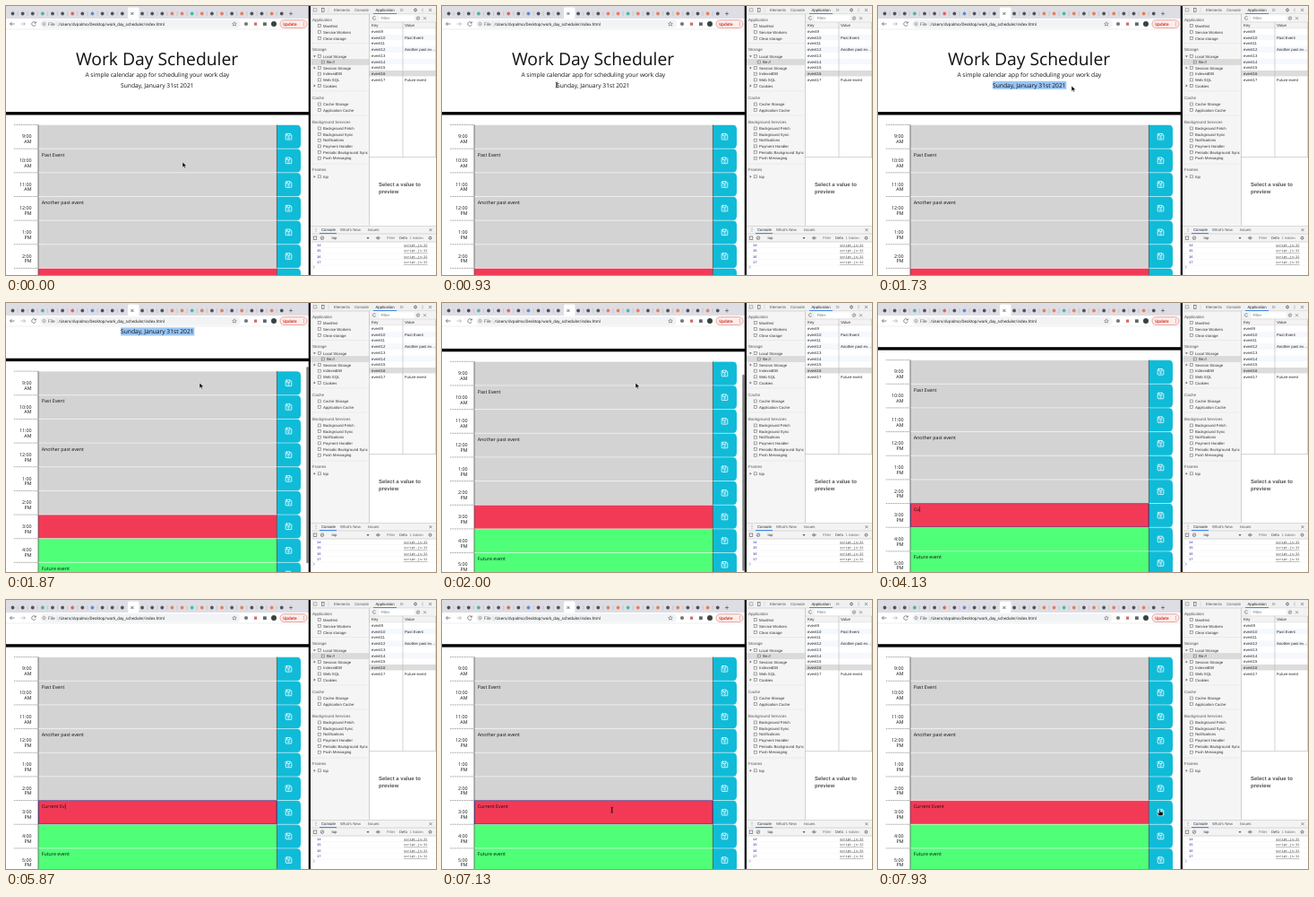
An HTML page that plays this animation: 480x300 px, repeating every 8 s.

```html
<!DOCTYPE html>
<html lang="en">
<head>
<meta charset="utf-8">
<title>Work Day Scheduler</title>
<style>
html, body { margin: 0; width: 100%; height: 100%; overflow: hidden; background: #fff; }
svg { display: block; width: 480px; height: 300px; }
text { white-space: pre; text-rendering: geometricPrecision; }
.page { font-family: "Open Sans", sans-serif; }
.ui { font-family: Roboto, sans-serif; }
.tools { font-family: "Liberation Sans", Arial, sans-serif; }
.mono { font-family: "Liberation Mono", monospace; }
</style>
</head>
<body>
<svg id="stage" viewBox="0 0 480 300"></svg>
<script>
const rect = (x, y, w, h, fill, extra = '') =>
  `<rect x="${x}" y="${y}" width="${w}" height="${h}" fill="${fill}" ${extra}/>`;
const text = (x, y, size, str, fill = '#111', extra = '') =>
  `<text x="${x}" y="${y}" font-size="${size}" fill="${fill}" ${extra}>${str}</text>`;
const path = (d, stroke, width = .7, extra = '') =>
  `<path d="${d}" fill="none" stroke="${stroke}" stroke-width="${width}" ${extra}/>`;
const dot = (x, y, r, fill, extra = '') =>
  `<circle cx="${x}" cy="${y}" r="${r}" fill="${fill}" ${extra}/>`;
const mid = 'text-anchor="middle"', end = 'text-anchor="end"', bold = 'font-weight="bold"';

const TOP = 132.5, PITCH = 26.66, NOW = 6, SCROLL = 68.9;
const HOURS = [9, 10, 11, 12, 1, 2, 3, 4, 5, 6];
const NOTES = { 1: 'Past Event', 3: 'Another past event', 8: 'Future event' };

function saveIcon(x, y) {
  return `<g transform="translate(${x} ${y})">` +
    path('M-3.3-2.7q0-.6.6-.6H1.8L3.3-1.8V2.7q0 .6-.6.6H-2.7q-.6 0-.6-.6zM-1.9-3.2V-.9H1.4V-3.2', '#fff', .8) +
    dot(0, 1.1, .9, 'none', 'stroke="#fff" stroke-width=".7"') + '</g>';
}

function hourRow(hour, i) {
  const y = TOP + i * PITCH;
  const fill = i < NOW ? '#d3d3d3' : i > NOW ? '#50ff78' : '#f23a57';
  return rect(36, y, 266.5, PITCH, fill) +
    `<path d="M302.3 ${y}h21.7q5 0 5 5v${PITCH - 10}q0 5-5 5h-21.7z" fill="#10bbd8"/>` +
    path(`M36 ${y}H329`, '#fff', .5) +
    path(`M9 ${y}H36`, '#777', .7, 'stroke-dasharray="1 .6"') +
    path(`M36 ${y}v${PITCH}M302.4 ${y}v${PITCH}`, '#444', .7) +
    saveIcon(315.5, y + 13.2) +
    text(28.5, y + 14.8, 5.34, hour + ':00', '#111', end) +
    text(28.5, y + 20.6, 5.34, i < 3 ? 'AM' : 'PM', '#111', end) +
    (NOTES[i] ? text(39.7, y + 8.6, 5.34, NOTES[i]) : '');
}

function page() {
  const y = TOP + NOW * PITCH;
  return '<g id="page" class="page">' +
    text(168.5, 65.8, 19.3, 'Work Day Scheduler', '#111', mid) +
    text(168.8, 78.6, 6.68, 'A simple calendar app for scheduling your work day', '#111', mid) +
    rect(128, 83.8, 0, 9, '#98c5f4', 'id="selection"') +
    text(168.8, 90.7, 6.68, 'Sunday, January 31st 2021', '#111', mid) +
    rect(0, 118.1, 338, 3.4, '#000') +
    HOURS.map(hourRow).join('') +
    rect(36.3, y + .2, 265.8, PITCH - .6, 'none', 'id="focus" stroke="#3a2f80" stroke-width=".7"') +
    text(39.7, y + 8.6, 5.34, '', '#111', 'id="typed"') +
    rect(0, y + 3.2, .5, 6.6, '#111', 'id="caret"') + '</g>' +
    rect(335.3, 26, 2.4, 219, '#7f7f7f', 'id="thumb" rx="1.2"');
}

const TAB_COLORS = { 3: '#4fb0a8', 6: '#d9695f', 8: '#5a8fd0', 18: '#3fbfa5',
  16: '#e2815f', 17: '#e2815f', 19: '#e2815f', 21: '#e2815f', 23: '#e2815f', 26: '#e2815f' };

function browserBar() {
  let s = '<g class="ui">' + rect(0, 0, 338, 14, '#dedde4') + rect(0, 14, 338, 12, '#fff') +
    path('M0 26H338', '#ddd', .5) + rect(136, 1.5, 12.5, 12.5, '#fff', 'rx="1.5"');
  for (let i = 0; i < 28; i++) {
    const x = 7.5 + i * 11.12;
    s += i === 12 ? path(`M${x - 1.5} 7l3 3m0-3l-3 3`, '#333')
      : dot(x, 8.5, 1.9, TAB_COLORS[i] || '#50535b');
    if (i < 27 && i !== 11 && i !== 12) s += path(`M${x + 5.6} 6v5`, '#a5a9af', .4);
  }
  return s + path('M316 8.5h4m-2-2v4', '#555') +
    path('M9.5 20h-5m2-2l-2 2 2 2', '#555') + path('M16.5 20h5m-2-2l2 2-2 2', '#aaa') +
    path('M33 18.8a2.3 2.3 0 1 0 .2 2M33.3 17.4v1.7h-1.7', '#555') +
    rect(38, 15.3, 224, 9.4, '#f1f3f4', 'rx="4.7"') +
    dot(42.5, 20, 1.7, 'none', 'stroke="#666" stroke-width=".5"') + path('M42.5 19.6v1.2', '#666', .5) +
    text(47, 21.8, 4.9, 'File', '#555') + path('M57 17.6v4.8', '#bbb', .4) +
    text(58.5, 21.8, 4.6, '/Users/dvpalmo/Desktop/work_day_scheduler/index.html', '#222') +
    path('M255 17.8l.7 1.5 1.6.1-1.2 1.1.4 1.6-1.5-.9-1.5.9.4-1.6-1.2-1.1 1.6-.1z', '#555', .5) +
    dot(268, 20, 2.1, '#777') + rect(277, 18.5, 3.2, 3.2, '#d2686a') +
    rect(287, 18.3, 3.8, 3.6, '#5f6368') + dot(299, 20, 3, '#35443e') +
    rect(306, 15.7, 30, 8.7, '#fdeeec', 'rx="4.3" stroke="#e06a62" stroke-width=".6"') +
    text(309.2, 21.7, 4.8, 'Update', '#c9271d', 'font-weight="500"') +
    [18.3, 20, 21.7].map(y => dot(332.3, y, .45, '#c9271d')).join('') + '</g>';
}

// [centre y, label, kind]: h heading, > / v tree item, s selected child
const SIDE = [
  [15, 'Application', 'h'], [22, 'Manifest'], [29, 'Service Workers'], [36, 'Clear storage'],
  [48, 'Storage', 'h'], [56, 'Local Storage', 'v'], [62.5, 'file://', 's'], [69, 'Session Storage', '>'],
  [75.7, 'IndexedDB'], [82.4, 'Web SQL'], [89, 'Cookies', '>'],
  [102, 'Cache', 'h'], [109.5, 'Cache Storage'], [116, 'Application Cache'],
  [129, 'Background Services', 'h'], [136.5, 'Background Fetch'], [143, 'Background Sync'],
  [149.7, 'Notifications'], [156.4, 'Payment Handler'], [163, 'Periodic Background Sync'],
  [169.7, 'Push Messaging'], [182.5, 'Frames', 'h'], [190.3, 'top', '>']
];

function sideItem([y, label, kind]) {
  if (kind === 'h') return text(342, y + 1.5, 4.5, label, '#555');
  const x = kind === 's' ? 358 : 354;
  const arrow = { v: 'M343 -.8h2.8l-1.4 2z', '>': 'M343.6 -1.4v2.8l2-1.4z' }[kind];
  return (kind === 's' ? rect(340, y - 3.4, 65, 6.8, '#dadada') : '') +
    (arrow ? `<path d="${arrow}" transform="translate(0 ${y})" fill="#666"/>` : '') +
    rect(x - 5.8, y - 1.5, 3.2, 3, 'none', 'stroke="#777" stroke-width=".6"') +
    text(x, y + 1.5, 4.25, label, '#333');
}

function storageTable() {
  const values = { 10: 'Past Event', 12: 'Another past ev…', 17: 'Future event' };
  let s = rect(405, 9, 75, 236, '#fff') + rect(405, 9, 75, 16, '#f3f3f3') +
    path('M405 18H480M405 25H480', '#ccc', .5) +
    path('M412.6 12.4a1.8 1.8 0 1 0 .2 1.8', '#555', .6) +
    rect(416.5, 10.4, 39, 6.6, '#fff') + text(418.5, 15.2, 4.4, 'Filter', '#777') +
    dot(460, 13.6, 1.7, 'none', 'stroke="#666" stroke-width=".6"') + path('M458.9 14.7l2.2-2.2', '#666', .6) +
    path('M466 12.2l3 3m0-3l-3 3', '#666', .6) +
    text(408, 23.2, 4.4, 'Key', '#333') + text(445, 23.2, 4.4, 'Value', '#333');
  for (let n = 9; n < 18; n++) {
    const y = 25.2 + (n - 9) * 6.68;
    s += rect(405, y, 75, 6.68, n === 16 ? '#dcdcdc' : n % 2 ? '#fff' : '#f5f8fd') +
      text(408, y + 4.9, 4.3, 'event' + n, '#222') + text(445, y + 4.9, 4.3, values[n] || '', '#222');
  }
  return s +
    path('M405.5 9V245M443 18V168.5M479.6 18V168.5M405 168.6H480', '#b5b5b5', .6) +
    text(416, 201, 6, 'Select a value to', '#555', bold) + text(416, 208.6, 6, 'preview', '#555', bold);
}

function drawer() {
  let s = rect(340, 245, 140, 55, '#fff') + rect(340, 245.5, 140, 18, '#f3f3f3') +
    path('M340 245.5H480M340 254H480M340 263H480', '#c4c4c4', .6) +
    [248, 249.7, 251.4].map(y => dot(346, y, .45, '#555')).join('') +
    text(352, 251.4, 4.3, 'Console', '#222') + rect(350, 253.2, 19, .9, '#1a73e8') +
    text(373, 251.4, 4.3, "What's New", '#555') + text(404, 251.4, 4.3, 'Issues', '#555') +
    path('M472.5 248.2l3 3m0-3l-3 3', '#555', .6) +
    rect(343.2, 257, 3.6, 3.4, 'none', 'stroke="#555" stroke-width=".6"') +
    dot(353, 258.7, 1.8, 'none', 'stroke="#555" stroke-width=".6"') + path('M351.8 260l2.4-2.5', '#555', .6) +
    text(363.5, 260.2, 4.2, 'top', '#333') + '<path d="M402.5 258h3l-1.5 2z" fill="#555"/>' +
    path('M413 258.7q2.3-3 4.6 0q-2.3 3-4.6 0z', '#555', .6) + dot(415.3, 258.7, .8, '#555') +
    text(425, 260.2, 4.2, 'Filter', '#777') + text(439, 260.2, 4.2, 'Defa', '#444') +
    text(450.5, 260.2, 4, '1 hidden', '#777') + dot(473.5, 258.7, 1.4, 'none', 'stroke="#555" stroke-width=".9"');
  for (let i = 0; i < 4; i++) {
    const y = 267.6 + i * 6.55;
    s += '<g class="mono">' + text(347, y, 3.9, 14 + i, '#1a1aa6') +
      text(470.5, y, 3.7, 'script.js:32', '#444', end + ' text-decoration="underline"') + '</g>' +
      path(`M340 ${y + 1.9}H480`, '#ececec', .4);
  }
  return s + path('M343 289.8l1.4 1.5-1.4 1.5', '#3b78e7', .6);
}

function devtools() {
  return '<g class="tools">' + rect(340, 0, 140, 300, '#f5f5f5') + rect(340, 0, 140, 9, '#f0f0f0') +
    path('M340 9H480', '#c4c4c4', .6) +
    rect(343.3, 2.7, 3.6, 3.4, 'none', 'stroke="#555" stroke-width=".6" stroke-dasharray="1 .5"') +
    rect(352.5, 2.3, 2.6, 4.2, 'none', 'stroke="#555" stroke-width=".6"') + path('M360 1.8v5.4', '#bbb', .4) +
    text(366, 6.1, 4.3, 'Elements', '#555') + text(389, 6.1, 4.3, 'Console', '#555') +
    text(412.5, 6.1, 4.3, 'Application', '#222') + rect(410, 8.2, 26, .9, '#1a73e8') +
    path('M440 3l1.3 1.5-1.3 1.5m1.8-3l1.3 1.5-1.3 1.5', '#555', .5) +
    dot(457, 4.5, 1.4, 'none', 'stroke="#555" stroke-width=".9"') +
    [2.9, 4.5, 6.1].map(y => dot(465, y, .45, '#555')).join('') + path('M472 3l3 3m0-3l-3 3', '#555', .6) +
    SIDE.map(sideItem).join('') + path('M340 41.5H405M340 95H405M340 122H405M340 176H405', '#ddd', .5) +
    storageTable() + drawer() + '</g>' + rect(337.7, 0, 2.3, 300, '#0a0a0a');
}

const CURSORS = {
  arrow: '<path d="M0 0v6.2l1.5-1.4 1 2.3 1.1-.4-1-2.2h2.1z" fill="#000" stroke="#fff" stroke-width=".5"/>',
  beam: path('M-1.4-3q1.4 0 1.4.8V2.2q0 .8-1.4.8M1.4-3Q0-3 0-2.2V2.2Q0 3 1.4 3', '#111', .7),
  hand: '<path d="M-1.3-3.4q.7-.7 1.3 0V-1l2.6.7q.8.3.7 1.2L2.7 3.6H-1.5L-3.2.9q0-1 .9-.6l1 .7z" fill="#111" stroke="#fff" stroke-width=".4"/>'
};

const $ = id => document.getElementById(id);
$('stage').innerHTML = page() + browserBar() + devtools() +
  Object.entries(CURSORS).map(([k, v]) => `<g id="${k}">${v}</g>`).join('');

// [time, x, y]
const MOVES = [[0, 197, 174], [70, 197, 174], [870, 128, 88], [930, 128, 88], [1730, 216, 89],
  [2670, 216, 89], [2930, 183, 229], [3130, 180, 234], [7000, 180, 234], [7800, 315, 237], [8000, 315, 237]];
const MESSAGE = 'Current Event';
const KEYS = [4000, 4130, 4270, 4470, 4730, 4870, 5070, 5400, 5670, 5870, 6000, 6130, 6270];

function pointer(t) {
  const i = MOVES.findIndex(m => m[0] > t);
  const [t0, x0, y0] = MOVES[i - 1], [t1, x1, y1] = MOVES[i];
  const p = (t - t0) / (t1 - t0), e = p * p * (3 - 2 * p);
  return [x0 + (x1 - x0) * e, y0 + (y1 - y0) * e];
}

const clamp = v => Math.max(0, Math.min(1, v));
const show = (id, on) => $(id).setAttribute('visibility', on ? 'visible' : 'hidden');

function draw(t) {
  const [x, y] = pointer(t);
  const scroll = t < 1760 ? 0 : SCROLL * (1 - Math.exp((1760 - t) / 65));
  $('page').setAttribute('transform', `translate(0 ${-scroll})`);
  $('thumb').setAttribute('y', 26 + scroll * .8);
  $('thumb').setAttribute('opacity', t < 1760 ? 0 : clamp((2600 - t) / 250));
  $('selection').setAttribute('width', t < 930 ? 0 : Math.max(0, Math.min(x, 210.3) - 128));

  const count = KEYS.filter(k => k <= t).length;
  const typed = $('typed'), focused = t >= 3530 && t < 7870;
  typed.textContent = MESSAGE.slice(0, count);
  $('caret').setAttribute('x', 39.9 + (count ? typed.getComputedTextLength() : 0));
  show('focus', focused);
  show('caret', focused && (t - (count ? KEYS[count - 1] : 3530)) % 1000 < 500);

  const hidden = t >= 4000 && t < 7000;
  const overText = t > 700 && t < 1660 || t > 2690;
  const shape = hidden ? '' : t > 7000 && x > 302 ? 'hand' : overText ? 'beam' : 'arrow';
  for (const id in CURSORS) {
    show(id, id === shape);
    $(id).setAttribute('transform', `translate(${x} ${y})`);
  }
}

const start = performance.now();
(function tick() {
  draw((performance.now() - start) % 8000);
  requestAnimationFrame(tick);
})();
</script>
</body>
</html>
```
